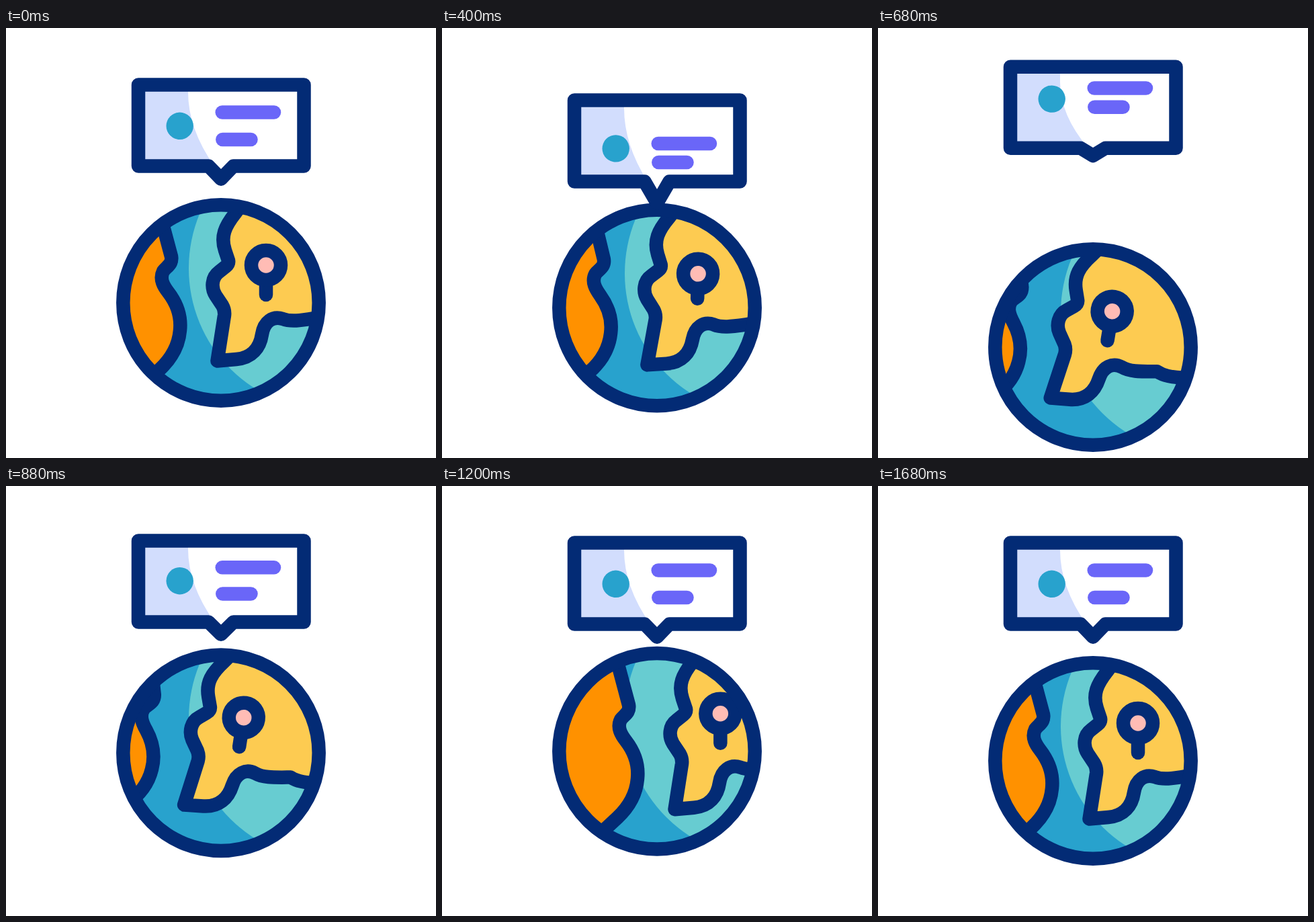
An HTML page for the animation above (2 s loop, 640 px wide and 640 px high).

```html
<!DOCTYPE html>
<html lang="en">
<head>
<meta charset="utf-8">
<title>Globe and speech bubble</title>
<style>
html, body { margin: 0; width: 100%; height: 100%; overflow: hidden; background: #fff; }
svg { display: block; width: 100vw; height: 100vh; }
.line { stroke: #032b75; stroke-width: 20.5; stroke-linecap: round; stroke-linejoin: round; }
.bar { stroke: #6a66f8; stroke-width: 20.5; stroke-linecap: round; }
</style>
</head>
<body>
<svg viewBox="0 0 640 640" fill="none">
  <defs>
    <clipPath id="disc"><circle cx="320" cy="409" r="150"/></clipPath>
    <clipPath id="frame"><path id="framePath"/></clipPath>
  </defs>

  <g id="globe">
    <g clip-path="url(#disc)">
      <circle cx="320" cy="409" r="150" fill="#28a2cd"/>
      <circle cx="483.5" cy="357.7" r="211.5" fill="#67ccd1"/>
      <g id="land" class="line">
        <path fill="#ff9100" d="M226 265L246 340C248 352 239 355 234 362C228 374 235 385 242 394
          C255 411 261 430 259 450C257 474 245 493 229 508L200 535L60 560V240Z"/>
        <path fill="#fdcb51" d="M365 243L341 276C326 295 319 310 326 331L331 346Q332 351 327 355
          L317 363C306 371 305 387 312 398L322 413Q326 420 325 428L314.5 495.5L343 493
          C366 491 378 476 381 456C384 437 397 428 412 433C425 438 440 435 465 431
          Q480 438 510 433L570 425V180H400Z"/>
      </g>
      <g id="pin" class="line">
        <path id="stem"/>
        <circle id="head" cx="387" r="22" fill="#ffbcb5"/>
      </g>
    </g>
    <circle class="line" cx="320" cy="409" r="145.7"/>
  </g>

  <g id="bubble">
    <path id="back" fill="#fff"/>
    <path id="shade" fill="#d2ddfd" clip-path="url(#frame)"/>
    <circle id="dot" cx="258.7" r="20.2" fill="#28a2cd"/>
    <path id="bar1" class="bar"/>
    <path id="bar2" class="bar"/>
    <path id="outline" class="line"/>
  </g>
</svg>
<script>
const LOOP = 2000, STEP = 40;
const el = id => document.getElementById(id);
const set = (id, name, value) => el(id).setAttribute(name, value);
const sine = u => (1 - Math.cos(Math.PI * u)) / 2;

// Eased value through [time, value] keys
function track(t, ...keys) {
  if (t <= keys[0][0]) return keys[0][1];
  for (let i = 1; i < keys.length; i++) {
    const [t0, a] = keys[i - 1], [t1, b, ease = sine] = keys[i];
    if (t < t1) return a + (b - a) * ease((t - t0) / (t1 - t0));
  }
  return keys[keys.length - 1][1];
}

// Bubble parts share one rhythm: rest, dip, jump, rest
const bounce = (t, rest, dip, jump) =>
  track(t, [80, rest], [400, dip], [700, jump], [930, rest]);

function drawGlobe(t) {
  const drop = track(t, [320, 0], [680, 66, u => u ** 1.45], [930, -20], [1680, 0]);
  const x = track(t, [280, 0], [760, -47], [780, -47], [1200, 32], [1680, 0]);
  const y = track(t, [280, 0], [760, -9.5], [780, -9.5], [1090, 0]);
  const turn = track(t, [280, 0], [760, 10], [780, 10], [1200, 0]);
  const lag = track(t, [280, 0], [1040, -5], [1360, -4.3], [1680, 0]);
  const squash = track(t, [80, 0], [400, 1], [640, 0]);
  const place = dx => `translate(${x + dx} ${y}) rotate(${turn} 320 409)`;

  set('globe', 'transform', `translate(0 ${drop})`);
  set('land', 'transform', place(0));
  set('pin', 'transform', place(lag));
  set('head', 'cy', 353 + 5 * squash);
  set('stem', 'd', `M387 ${375 + 5 * squash}V${397 - 2 * squash}`);
}

function drawBubble(t) {
  const tip = 205.5 + bounce(t, 19.2, 32, 11);
  const frame = `M197 84.5H443.5V205.5H338.5L320 ${tip}L301.5 205.5H197Z`;
  const top = bounce(t, 95, 96, 107), end = bounce(t, 310, 306, 313);
  const y1 = 125.5 + bounce(t, 0, 23.5, -9.6);
  const y2 = 166 + bounce(t, 0, 11, -22);

  set('bubble', 'transform', `translate(0 ${bounce(t, 0, 23, -27.2)})`);
  for (const id of ['back', 'outline', 'framePath']) set(id, 'd', frame);
  set('shade', 'd', `M197 84.5H271V${top}Q271 ${(top + 205.5) / 2} ${end} 205.5H197Z`);
  set('dot', 'cy', 145.8 + bounce(t, 0, 10.6, -13.8));
  set('bar1', 'd', `M321.7 ${y1}H399`);
  set('bar2', 'd', `M322.3 ${y2}H364.5`);
}

function draw(now) {
  const t = Math.floor((now % LOOP) / STEP) * STEP;
  drawGlobe(t);
  drawBubble(t);
}

let start;
function tick(now) {
  start ??= now;
  draw(now - start);
  requestAnimationFrame(tick);
}
draw(0);
requestAnimationFrame(tick);
</script>
</body>
</html>
```
